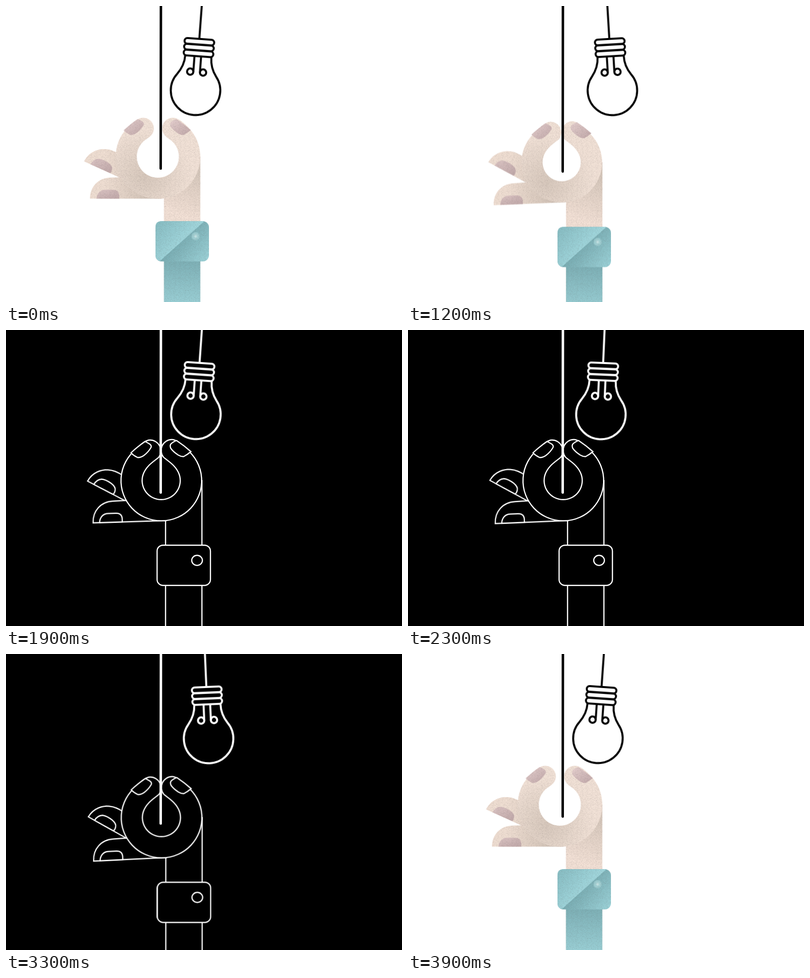
Write an HTML page without scripts that moves like this. It is 800 px wide and 600 px high and loops after 4 s.

```html
<!DOCTYPE html>
<html lang="en">
<head>
<meta charset="utf-8">
<title>Light switch</title>
<style>
  html, body { margin: 0; width: 100%; height: 100%; overflow: hidden; }
  svg { display: block; width: 800px; height: 600px; color: #000; background: #fff; animation: room 4s step-end infinite; }

  .line { fill: none; stroke: currentColor; stroke-width: 4; stroke-linecap: round; }
  .cord { stroke-width: 5; }
  .dark { fill: #000; stroke: #fff; stroke-width: 2.4; visibility: hidden; animation: night 4s step-end infinite; }
  .light { animation: day 4s step-end infinite; }

  .swing, .pull, .cord, .upper, .lower, .open, .ring, .nail-l, .nail-r {
    animation-duration: 4s;
    animation-iteration-count: infinite;
    animation-timing-function: cubic-bezier(.37, 0, .63, 1);
  }
  .swing { transform-origin: 399.5px -55px; animation-name: swing; animation-duration: 1s; animation-direction: alternate; }
  .pull { animation-name: pull; animation-duration: 2s; }
  .cord { animation-name: cord; animation-duration: 2s; }
  .upper { --turn: 5deg; transform-origin: 250px 342px; animation-name: spread; }
  .lower { --turn: -2.9deg; transform-origin: 316px 358px; animation-name: spread; }
  .open { --shift: -2px, 4px; animation-name: open; }
  .nail-l { --shift: -11.5px, 3px; animation-name: open; }
  .nail-r { --shift: 3px, 5px; animation-name: open; }
  .light .ring { animation-name: pinch; }

  @keyframes room {
    0%, 83.75% { color: #000; background: #fff; }
    33.75% { color: #fff; background: #000; }
  }
  @keyframes day { 0%, 83.75% { visibility: visible; } 33.75% { visibility: hidden; } }
  @keyframes night { 0%, 83.75% { visibility: hidden; } 33.75% { visibility: visible; } }
  @keyframes swing { from { transform: rotate(4.2deg); } to { transform: rotate(-4.2deg); } }
  @keyframes pull {
    0%, 54.5%, 86.5%, to { transform: none; }
    67% { transform: translate(.5px, 28px); }
  }
  @keyframes cord {
    0%, 54.5%, 87.5%, to { transform: none; }
    68% { transform: translateY(16px); }
  }
  @keyframes spread {
    0%, 12.5%, 39%, 67.5%, 94%, to { transform: rotate(0deg); }
    26.25%, 53.75%, 81.25% { transform: rotate(var(--turn)); }
  }
  @keyframes open {
    0%, 12.5%, 96%, to { transform: translate(var(--shift)); }
    27.5%, 86% { transform: translate(0, 0); }
  }
  @keyframes pinch {
    0%, 12.5%, 96%, to {
      d: path("M256 239.5A85.5 85.5 0 1 0 364.6 239.5C357.3 233 349.3 226.5 340.3 226.5A21.5 21.5 0 0 0 325.3 263.5C328.3 266.5 330.8 268.4 333.7 270.2A42.5 42.5 0 1 1 286.3 270.2C289.3 268.4 292.3 266.5 295.3 263.5A21.5 21.5 0 0 0 280.3 226.5C271.3 226.5 263.3 233 256 239.5Z");
    }
    27.5%, 86% {
      d: path("M262 242.4A81.5 81.5 0 1 0 365.6 242.4C354.6 233 345 222 335 222A22 22 0 0 0 318 257.5C324 264 343 273 350 293A38.5 38.5 0 1 1 277 293C284 273 303 264 309 257.5A22 22 0 0 0 291 223C281 223 271 233.5 262 242.4Z");
    }
  }
</style>
</head>
<body>
<svg viewBox="0 0 800 600">
  <defs>
    <path id="arm" d="M322.3 360V720H395.8V304"/>
    <rect id="cuff" x="305.2" y="436.2" width="107.8" height="81.5" rx="12"/>
    <path id="upper" d="M260 355L244 348L163 311C172 292 190 286 203 286C216 286 226 291 234 296L260 330Z"/>
    <path id="upper-nail" d="M176 317Q181 307 191 305.5Q199 305.5 211 313Q221 320 219.5 327Q219 332 216 335Z"/>
    <path id="lower" d="M320 386.5H175C175 362 192 344 217 343.8L245 343L262 345Z"/>
    <path id="lower-nail" d="M188 386.5C189 376 195 368.5 206 368.5H222Q233 368.5 234 379V386.5Z"/>
    <path id="nail-l" d="M252.5 249Q258 255 266 258.5Q272 259 279 254Q288 247 293 238Q294.5 234 290 231Q285 228 281 226Q265 237 252.5 249Z"/>
    <path id="nail-r" d="M344.5 224Q337 227 333 231Q330.5 235 333 240Q338 247 348 253.5Q354 257 359 256.5Q366 253 373.5 246.5Q359.5 234 344.5 224Z"/>

    <radialGradient id="palm" gradientUnits="userSpaceOnUse" cx="283" cy="345" r="95">
      <stop stop-color="#d8c9bd"/><stop offset="1" stop-color="#f2e2d7"/>
    </radialGradient>
    <linearGradient id="finger" gradientUnits="userSpaceOnUse" x1="205" y1="0" x2="300" y2="0">
      <stop stop-color="#f0dfd3"/><stop offset="1" stop-color="#d0c1b5"/>
    </linearGradient>
    <linearGradient id="wrist" gradientUnits="userSpaceOnUse" x1="392" y1="335" x2="362" y2="425">
      <stop stop-color="#d7c8bc"/><stop offset="1" stop-color="#f3e1d6"/>
    </linearGradient>
    <linearGradient id="tip" x1="0" y1="0" x2="1" y2="1">
      <stop stop-color="#e6d0cf"/><stop offset="1" stop-color="#c2a9aa"/>
    </linearGradient>
    <linearGradient id="nail" x1="0" y1="0" x2="1" y2="1">
      <stop stop-color="#dcc5c4"/><stop offset="1" stop-color="#c0a8a9"/>
    </linearGradient>
    <linearGradient id="sleeve" gradientUnits="userSpaceOnUse" x1="0" y1="517" x2="0" y2="610">
      <stop stop-color="#7eb1b7"/><stop offset="1" stop-color="#9dd3d9"/>
    </linearGradient>
    <linearGradient id="fold" gradientUnits="userSpaceOnUse" x1="315" y1="440" x2="358" y2="478">
      <stop stop-color="#8ac0c6"/><stop offset="1" stop-color="#a0d6dc"/>
    </linearGradient>
    <linearGradient id="flap" gradientUnits="userSpaceOnUse" x1="358" y1="477" x2="405" y2="520">
      <stop stop-color="#7cb0b6"/><stop offset="1" stop-color="#9bd2d8"/>
    </linearGradient>
    <radialGradient id="button">
      <stop stop-color="#d2eaeb"/><stop offset=".4" stop-color="#a9d5d8"/><stop offset="1" stop-color="#93c5ca"/>
    </radialGradient>
    <filter id="grain" x="0" y="0" width="1" height="1" color-interpolation-filters="sRGB">
      <feTurbulence type="fractalNoise" baseFrequency=".9" numOctaves="2" seed="4"/>
      <feColorMatrix values="0 0 0 0 .35  0 0 0 0 .32  0 0 0 0 .32  .8 0 0 0 -.4"/>
      <feComposite in2="SourceAlpha" operator="in" result="specks"/>
      <feMerge><feMergeNode in="SourceGraphic"/><feMergeNode in="specks"/></feMerge>
    </filter>
  </defs>

  <g class="line swing">
    <path d="M399.5-60V66"/>
    <rect x="370" y="67" width="60" height="11.6" rx="5.8"/>
    <rect x="370" y="78.8" width="60" height="11.6" rx="5.8"/>
    <rect x="370" y="90.6" width="60" height="11.6" rx="5.8"/>
    <path d="M373.5 103C373.5 118 367 131.5 360 141A50 50 0 1 0 439 141C432 131.5 426.5 118 426.5 103"/>
    <path d="M392.3 104V134.5M405.7 104V134.5"/>
    <circle cx="386" cy="134.5" r="6.4"/>
    <circle cx="412" cy="134.5" r="6.4"/>
  </g>

  <g class="light">
    <g transform="translate(-3.3)">
      <g class="pull">
        <g filter="url(#grain)">
          <use href="#arm" fill="url(#wrist)"/>
          <path d="M322.3 500H395.8V720H322.3Z" fill="url(#sleeve)"/>
          <use href="#cuff" fill="url(#flap)"/>
          <path d="M317.2 436.2H404L314 517Q305.2 514 305.2 505.7V448.2Q305.2 436.2 317.2 436.2Z" fill="url(#fold)"/>
          <circle cx="386.3" cy="466.7" r="8.5" fill="url(#button)"/>
        </g>
        <g filter="url(#grain)">
          <g class="open">
            <g class="upper">
              <use href="#upper" fill="url(#finger)"/>
              <use href="#upper-nail" fill="url(#nail)"/>
            </g>
            <g class="lower">
              <use href="#lower" fill="url(#finger)"/>
              <use href="#lower-nail" fill="url(#nail)"/>
            </g>
          </g>
          <path class="ring" fill="url(#palm)" d="M256 239.5A85.5 85.5 0 1 0 364.6 239.5C357.3 233 349.3 226.5 340.3 226.5A21.5 21.5 0 0 0 325.3 263.5C328.3 266.5 330.8 268.4 333.7 270.2A42.5 42.5 0 1 1 286.3 270.2C289.3 268.4 292.3 266.5 295.3 263.5A21.5 21.5 0 0 0 280.3 226.5C271.3 226.5 263.3 233 256 239.5Z"/>
          <g class="nail-l"><use href="#nail-l" fill="url(#tip)"/></g>
          <g class="nail-r"><use href="#nail-r" fill="url(#tip)"/></g>
        </g>
      </g>
    </g>
  </g>

  <g class="dark">
    <g class="pull">
      <use href="#arm"/>
      <use href="#cuff"/>
      <ellipse cx="386" cy="467" rx="10.8" ry="10.2"/>
      <g class="upper"><use href="#upper"/><use href="#upper-nail"/></g>
      <g class="lower"><use href="#lower"/><use href="#lower-nail"/></g>
      <path d="M262 242.4A81.5 81.5 0 1 0 365.6 242.4C354.6 233 345 222 335 222A22 22 0 0 0 318 257.5C324 264 343 273 350 293A38.5 38.5 0 1 1 277 293C284 273 303 264 309 257.5A22 22 0 0 0 291 223C281 223 271 233.5 262 242.4Z"/>
      <use href="#nail-l"/>
      <use href="#nail-r"/>
    </g>
  </g>

  <path class="line cord" d="M313-40L312.5 329.5"/>
</svg>
</body>
</html>
```
